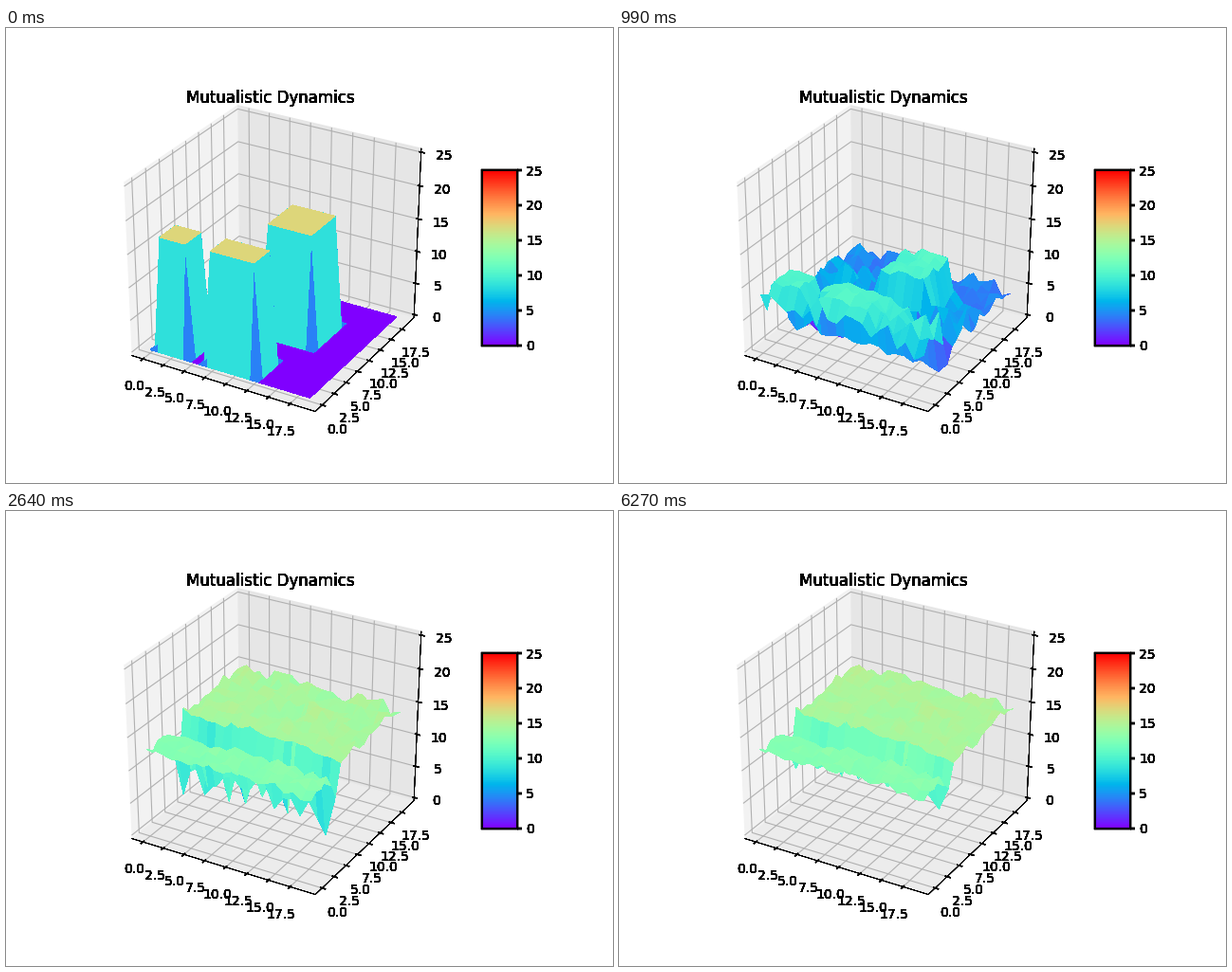
These frames come from a looping animation (640 px wide and 480 px high, 6.6 s). A matplotlib script:

```python
import numpy as np
import matplotlib.pyplot as plt
from matplotlib.animation import FuncAnimation
from matplotlib.cm import ScalarMappable
from matplotlib.colors import Normalize
from mpl_toolkits.mplot3d import Axes3D

W, H = 640, 480
N, FRAMES, STEP_MS = 20, 20, 330
Z_MAX = 25


class WideAxes(Axes3D):
    """3D axes that fill their rectangle instead of shrinking to a square."""

    def apply_aspect(self, position=None):
        pass


def px_rect(left, top, width, height):
    return [left / W, 1 - (top + height) / H, width / W, height / H]


def harden(artist, passes=12):
    """Draw an artist several times so its soft edges turn solid."""
    draw = artist.draw

    def repeat(renderer):
        for _ in range(passes):
            draw(renderer)

    artist.draw = repeat


# Four communities in node order; each grows as cap * (1 - exp(-(k/time)^power)).
ends = [100, 134, 267]
group = np.searchsorted(ends, np.arange(N * N), side="right").reshape(N, N)
cap = np.choose(group, [12.9, 9.6, 14.5, 14.7])
time = np.choose(group, [2.85, 6.9, 3.65, 4.7])
power = np.choose(group, [3.2, 2.3, 3.8, 2.6])

# Well linked nodes grow faster and settle higher, most so in the weak community.
rng = np.random.default_rng(7)
links = np.clip(rng.normal(size=(N, N)), -2, 2)
links[5, [1, -2]] = -2
links[5, [0, -1]] = 1
weak = group == 1
speed = 1 + np.where(weak, .16, .08) * links
settled = cap + np.where(weak, 1.1, .55) * links

X, Y = np.meshgrid(np.arange(N), np.arange(N))
block = np.zeros((N, N), bool)
block[1:5, 1:5] = block[1:5, 7:13] = block[9:15, 9:15] = True


def heights(k):
    z = settled * (1 - np.exp(-(k * speed / time) ** power))
    z -= (1 - Y / 10) * k * np.exp(1 - k)  # early dip near the front
    top = 10.3 + 6.7 * np.exp(-2 * k) + .4 * links * min(k, 1)
    return np.where(block, np.maximum(z, top), z)


fig = plt.figure(figsize=(W / 100, H / 100), dpi=100, facecolor="white")
ax = fig.add_axes(px_rect(80, 57.6, 396.8, 369.6), axes_class=WideAxes)
ax.view_init(elev=30, azim=-60)
ax.set_box_aspect((1, 1, 1), zoom=3 ** .5 / 1.8294640721620434)

span = (N - 1) * 1.1
pad = span / 48 + (N - 1) * .05
ax.set_xlim(-pad, N - 1 + pad)
ax.set_ylim(-pad, N - 1 + pad)
ax.set_zlim(-Z_MAX / 48, Z_MAX * 49 / 48)
ax.set_xticks(np.arange(0, N, 2.5))
ax.set_yticks(np.arange(0, N, 2.5))
ax.set_zticks(range(0, Z_MAX + 1, 5))
for axis, grey in ((ax.xaxis, .95), (ax.yaxis, .9), (ax.zaxis, .925)):
    axis.set_pane_color((grey, grey, grey, 1))
    axis.line.set_linewidth(.4)
    harden(axis)

title = fig.text(278.4 / W, 1 - 78.8 / H, "Mutualistic Dynamics",
                 size=12, ha="center", va="baseline")
harden(title)

norm = Normalize(0, Z_MAX)
cax = fig.add_axes(px_rect(501.6, 150, 36.96, 184.8))
bar = fig.colorbar(ScalarMappable(norm, "rainbow"), cax=cax,
                   ticks=range(0, Z_MAX + 1, 5))
bar.outline.set_linewidth(1.5)
cax.tick_params(width=1.5)
harden(cax)

surfaces = []


def update(k):
    while surfaces:
        surfaces.pop().remove()
    surfaces.append(ax.plot_surface(
        X, Y, heights(k), cmap="rainbow", norm=norm,
        linewidth=0, antialiased=False))
    return surfaces


anim = FuncAnimation(fig, update, frames=FRAMES, interval=STEP_MS,
                     init_func=lambda: update(0), repeat=True,
                     repeat_delay=0, blit=False)
plt.show()
```
